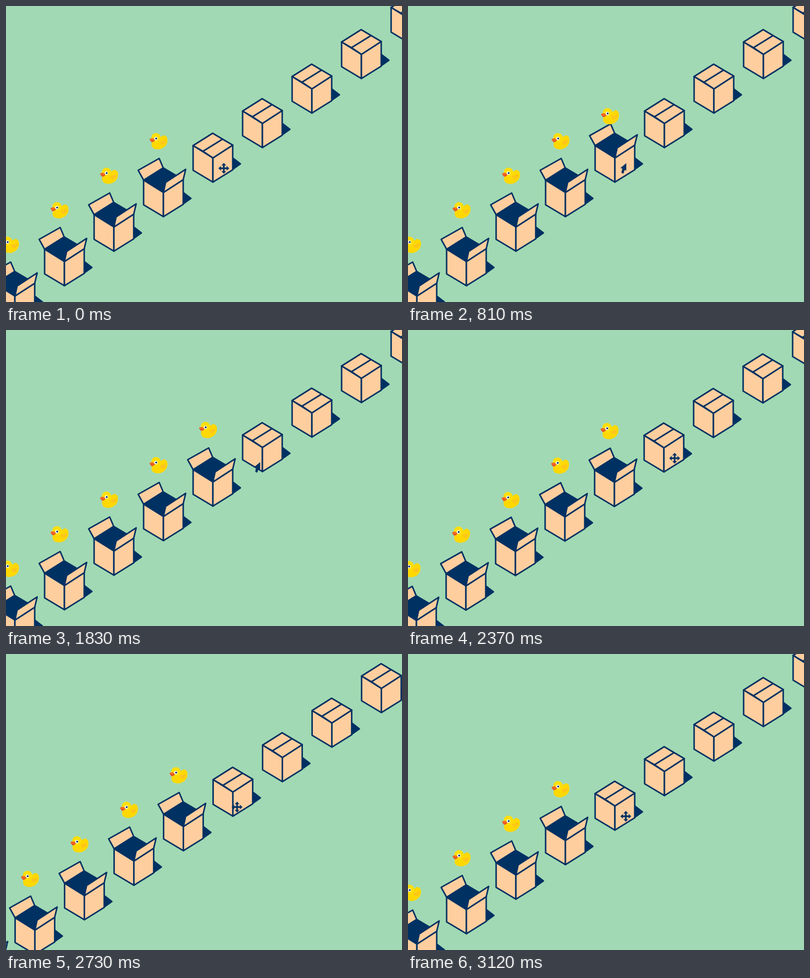
These frames come from a looping animation (800x600 px, 3.15 s). An HTML page with a canvas:

```html
<!DOCTYPE html>
<html>
<head>
<meta charset="utf-8">
<title>Boxes and ducks</title>
<style>
  html, body { margin: 0; width: 100%; height: 100%; overflow: hidden; background: #a1d9b4; }
  canvas { display: block; }
</style>
</head>
<body>
<canvas id="stage" width="800" height="600"></canvas>
<script>
const ctx = document.getElementById('stage').getContext('2d');
const LOOP = 3150, STEP_X = 100, STEP_Y = -70;
const NAVY = '#003163', CARD = '#ffce9e', GROUND = '#a1d9b4';

const clamp = u => Math.max(0, Math.min(1, u));
const progress = (t, start, length) => clamp((t - start) / length);
const cubicInOut = u => u < .5 ? 4 * u ** 3 : 1 - 4 * (1 - u) ** 3;
const elasticOut = (u, period) =>
  u <= 0 ? 0 : u >= 1 ? 1 : 1 - 2 ** (-10 * u) * Math.cos(u * 2 * Math.PI / period);
const mix = (a, b, p) => a.map((v, i) => v + (b[i] - v) * p);

function poly(points, fill, width = 3) {
  ctx.beginPath();
  points.forEach(([x, y]) => ctx.lineTo(x, y));
  ctx.closePath();
  ctx.fillStyle = fill;
  ctx.fill();
  if (width) {
    ctx.strokeStyle = NAVY;
    ctx.lineWidth = width;
    ctx.stroke();
  }
}

function shape(path, fill) {
  ctx.fillStyle = fill;
  ctx.fill(new Path2D(path));
}

function dot(x, y, r, fill) {
  ctx.beginPath();
  ctx.arc(x, y, r, 0, 7);
  ctx.fillStyle = fill;
  ctx.fill();
}

function at(x, y, draw) {
  ctx.save();
  ctx.translate(x, y);
  draw();
  ctx.restore();
}

function duck() {
  shape('M-13 1C-18 18 0 17.500 5 15.500C16 12 20 2 17.500 -7C15 -12.500 10 -13 7.500 -10C5 -9 3 -8 2 -6Z', '#ffd800');
  shape('M4 -1C8 2 11 -4 15 -2C16 4 10 9 5 6C3 4 3 1 4 -1Z', '#ffc61a');
  dot(-5, -7, 9.5, '#ffdf0b');
  shape('M-18 -4.500C-14 -7 -10 -6.500 -6.500 -2.500C-8 0 -11 2.500 -15 1.500C-14 0 -18 -1 -18 -4.500Z', '#f26a21');
  shape('M-17.500 -3C-14 -1 -11 -1 -7 -2C-9 1 -12 2.500 -15 1.500C-14 0 -17 -1 -17.500 -3Z', '#e4532b');
  dot(-5.2, -5.3, 3.4, '#fff');
  dot(-4.6, -5.4, 1.9, NAVY);
}

// The origin is the top corner nearest the viewer.
const FRONT = [0, 0], LEFT = [-40, -25], BACK = [-.5, -50], RIGHT = [40, -26], BASE = [0, 49];
const SEAM = [[-20, -13.5], [19.5, -38]];

function box(open, rise) {
  poly([[40, 0], [55.5, 12], [40, 23]], NAVY);
  poly([LEFT, BACK, RIGHT, FRONT], NAVY);
  poly([LEFT, mix(SEAM[0], [-51, -45], open), mix(SEAM[1], [-8.5, -69], open), BACK], CARD);
  if (rise > 0) at(-10, 1 - 105 * rise, duck);
  poly([LEFT, FRONT, BASE, [-40, 25]], CARD);
  poly([FRONT, RIGHT, [40, 24], BASE], CARD);
  poly([FRONT, mix(SEAM[0], [4.5, -20.5], open), mix(SEAM[1], [45, -47], open), RIGHT], CARD);
}

function arrow() {
  poly([[1, -10.5], [-11, -.5], [-7, .5], [-9, 9], [-5, 11], [-2, 3], [1, 5]], NAVY, 0);
}

function moveIcon() {
  for (let i = 0; i < 4; i++) {
    poly([[0, -10.7], [4.3, -6], [1.4, -6], [1.4, 0], [-1.4, 0], [-1.4, -6], [-4.3, -6]], NAVY, .5);
    ctx.rotate(Math.PI / 2);
  }
}

function ripple(u) {
  const radius = 40 * (1 - (1 - u) ** 2);
  ctx.beginPath();
  ctx.save();
  ctx.transform(.8, -.5, 0, .8, 0, 0);
  ctx.arc(0, 0, radius, 0, 2 * Math.PI);
  ctx.restore();
  ctx.strokeStyle = `rgba(255,255,255,${1 - u})`;
  ctx.lineWidth = 3;
  ctx.stroke();
}

function draw(t) {
  ctx.fillStyle = GROUND;
  ctx.fillRect(0, 0, 800, 600);
  ctx.lineJoin = 'round';

  const open = elasticOut(progress(t, 60, 1000), .3);
  const rise = elasticOut(progress(t, 660, 1900), .4);
  const slide = cubicInOut(progress(t, 2250, 900));
  for (let k = 5; k >= -5; k--) {
    const place = k - slide;
    at(418 + place * STEP_X, 308 + place * STEP_Y,
      () => box(k < 0 ? 1 : k ? 0 : open, k < 0 ? 1 : k ? 0 : rise));
  }

  const click = progress(t, 60, 600);
  if (click > 0 && click < 1) at(438.5, 321.5, () => ripple(click));

  const reach = cubicInOut(progress(t, 1300, 900)) - cubicInOut(progress(t, 2250, 810));
  at(440 + reach * STEP_X, 329 + reach * STEP_Y, t >= 60 && t < 2230 ? arrow : moveIcon);
}

const begin = performance.now();
function tick() {
  draw((performance.now() - begin) % LOOP);
  requestAnimationFrame(tick);
}
tick();
</script>
</body>
</html>
```
